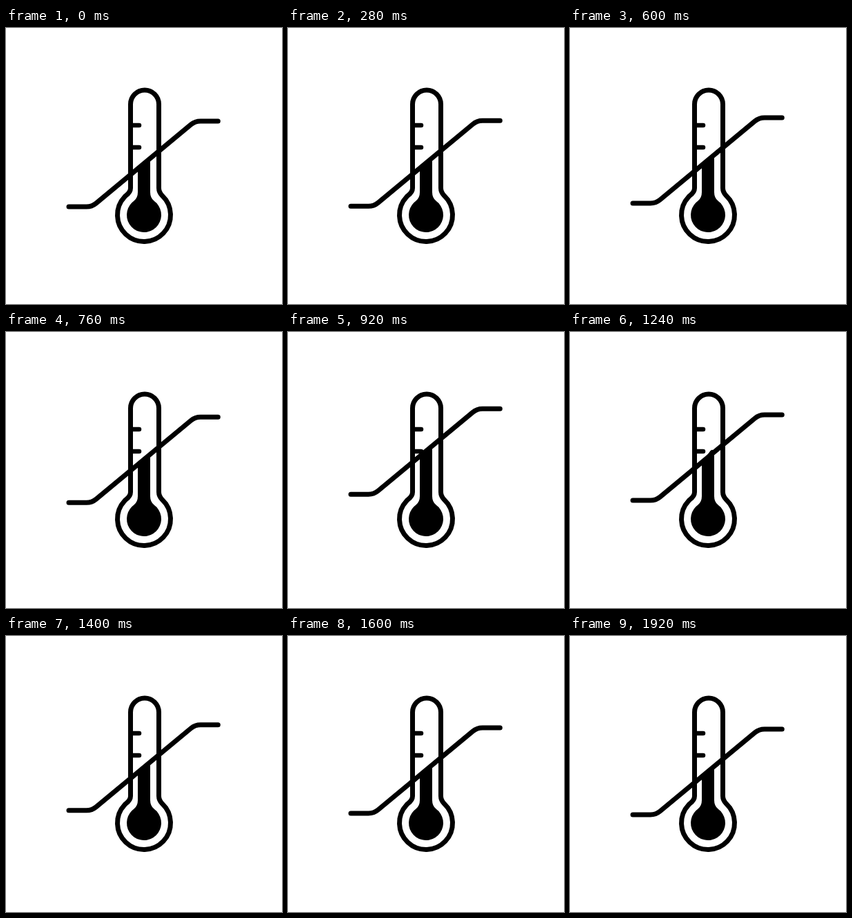
Recreate the animation shown at these times as an HTML page with a canvas. Size 400x400 px, loop 2.96 s.

```html
<!DOCTYPE html>
<html lang="en">
<head>
<meta charset="utf-8">
<title>Thermometer</title>
<style>
html, body { margin: 0; width: 100%; height: 100%; overflow: hidden; background: #fff; }
canvas { display: block; width: 400px; height: 400px; }
</style>
</head>
<body>
<canvas id="stage" width="400" height="400"></canvas>
<script>
const ctx = document.getElementById('stage').getContext('2d');
const LOOP = 2960, STEP = 40;
const PEAK = 1020, RISE = 1000, HEIGHT = 25;
const SLOPE = 124 / 149.5;

// Cubic bezier easing (1, 0, 0.67, 1), solved by bisection
function ease(x) {
  let lo = 0, hi = 1;
  for (let i = 0; i < 30; i++) {
    const s = (lo + hi) / 2, r = 1 - s;
    if (3 * s * r * r + 3 * 0.67 * s * s * r + s * s * s < x) lo = s;
    else hi = s;
  }
  return lo * lo * (3 - 2 * lo);
}

function riseAt(t) {
  const u = 1 - Math.abs(t - PEAK) / RISE;
  return u > 0 ? HEIGHT * ease(u) : 0;
}

function stroke(width, trace) {
  ctx.lineWidth = width;
  ctx.beginPath();
  trace();
  ctx.stroke();
}

function drawGlass() {
  stroke(7, () => {
    ctx.moveTo(180.5, 232);
    ctx.lineTo(180.5, 110.5);
    ctx.arc(201, 110.5, 20.5, Math.PI, 0);
    ctx.lineTo(221.5, 232);
    ctx.quadraticCurveTo(221.5, 238, 226.4, 243);
    ctx.arc(200, 271, 38.5, Math.atan2(-28, 26.4), Math.atan2(-28, -26.4));
    ctx.quadraticCurveTo(180.5, 238, 180.5, 232);
    ctx.closePath();
  });
  for (const y of [141, 173]) {
    stroke(6.5, () => {
      ctx.moveTo(182, y);
      ctx.lineTo(193, y);
    });
  }
}

// The top of the column lags slightly while the line falls
function drawMercury(rise, drop) {
  const lineY = x => 259 - rise - (x - 124.5) * SLOPE;
  ctx.beginPath();
  ctx.moveTo(191, 238);
  ctx.lineTo(191, lineY(191));
  ctx.arcTo(209, lineY(209) - 2 - 1.8 * drop, 209, 238, 3);
  ctx.lineTo(209, 238);
  ctx.quadraticCurveTo(209, 246, 214.5, 250.6);
  ctx.arc(200, 271, 25, Math.atan2(-20.4, 14.5), Math.atan2(-20.4, -14.5));
  ctx.quadraticCurveTo(191, 246, 191, 238);
  ctx.fill();
}

function drawLine(rise) {
  const low = 259 - rise, high = 135 - rise;
  stroke(7, () => {
    ctx.moveTo(91, low);
    ctx.arcTo(124.5, low, 274, high, 22);
    ctx.arcTo(274, high, 307.3, high, 22);
    ctx.lineTo(307.3, high);
  });
}

function draw(t) {
  const rise = riseAt(t);
  ctx.fillStyle = '#fff';
  ctx.fillRect(0, 0, 400, 400);
  ctx.fillStyle = ctx.strokeStyle = '#000';
  ctx.lineCap = ctx.lineJoin = 'round';
  drawGlass();
  drawMercury(rise, Math.max(0, riseAt(t - STEP) - rise));
  drawLine(rise);
}

const start = performance.now();
function tick() {
  const t = (performance.now() - start) % LOOP;
  draw(Math.floor(t / STEP) * STEP);
  requestAnimationFrame(tick);
}
tick();
</script>
</body>
</html>
```
